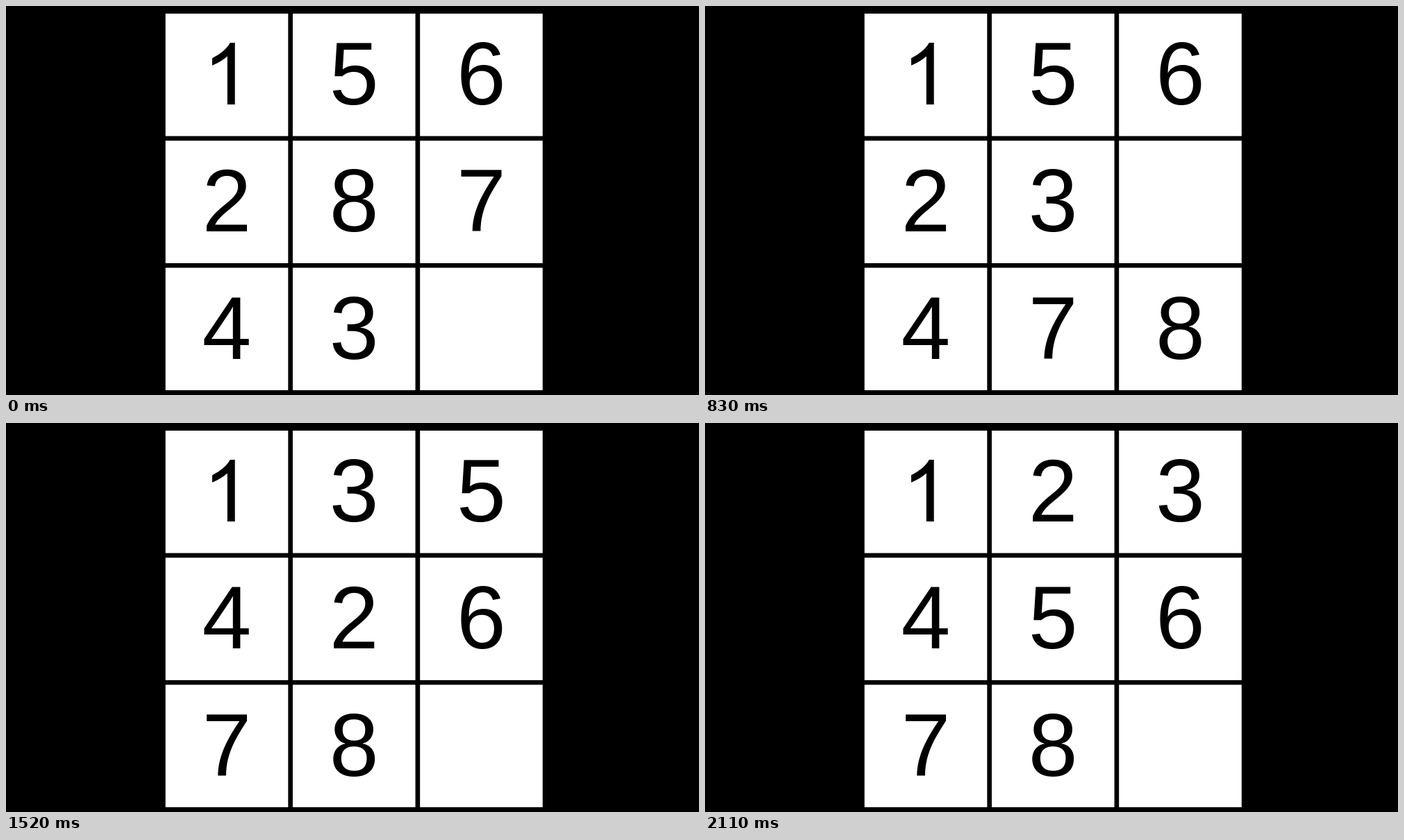
Animation, 998 px wide and 561 px high, one loop 2.51 s. Source, as an HTML page:

```html
<!DOCTYPE html>
<html lang="en">
<head>
<meta charset="utf-8">
<title>Sliding puzzle</title>
<style>
  html, body { margin: 0; width: 100%; height: 100%; overflow: hidden; background: #000; }
  svg { display: block; width: 998px; height: 561px; }
  text { font: 127.5px "Liberation Sans", Arial, sans-serif; text-anchor: middle; }
</style>
</head>
<body>
<svg id="stage" viewBox="0 0 998 561"></svg>
<script>
const LOOP = 2510, PITCH = 183.25, SIZE = 176.6;
const START = "15628743_";
// Each digit slides into the empty cell at the matching time.
const MOVES = "783786532478653256";
const TIMES = [450, 550, 640, 730, 830, 910, 1010, 1140, 1240, 1330, 1430, 1520,
               1650, 1750, 1850, 1940, 2030, 2110];
// A "1" without a foot, in font units around its centre.
const ONE = "M193 0H13V1147Q-52 1085 -157 1023Q-263 961 -347 930V1104" +
            "Q-196 1175 -83 1276Q30 1377 77 1472H193Z";

const stage = document.getElementById("stage");

function add(parent, tag, attrs) {
  const el = document.createElementNS("http://www.w3.org/2000/svg", tag);
  for (const key in attrs) el.setAttribute(key, attrs[key]);
  return parent.appendChild(el);
}

function cellOffset(cell) {
  return [cell % 3 * PITCH, Math.floor(cell / 3) * PITCH];
}

for (let cell = 0; cell < 9; cell++) {
  const [x, y] = cellOffset(cell);
  add(stage, "rect", { x: 229.7 + x, y: 11 + y, width: SIZE, height: SIZE, fill: "#fff" });
}

const digits = {};
for (const d of "12345678") {
  digits[d] = add(stage, "g", {});
  if (d === "1") add(digits[d], "path", { d: ONE, transform: "scale(.0605 -.0605)" });
  else add(digits[d], "text", {}).textContent = d;
}

function boardAt(time) {
  const board = [...START];
  TIMES.forEach((at, i) => {
    if (time < at) return;
    const from = board.indexOf(MOVES[i]), gap = board.indexOf("_");
    board[gap] = MOVES[i];
    board[from] = "_";
  });
  return board;
}

function draw(now) {
  boardAt(now % LOOP).forEach((d, cell) => {
    if (d === "_") return;
    const [x, y] = cellOffset(cell);
    digits[d].setAttribute("transform", `translate(${318 + x} ${142 + y})`);
  });
}

let begin;
function tick(now) {
  begin ??= now;
  draw(now - begin);
  requestAnimationFrame(tick);
}
draw(0);
requestAnimationFrame(tick);
</script>
</body>
</html>
```
